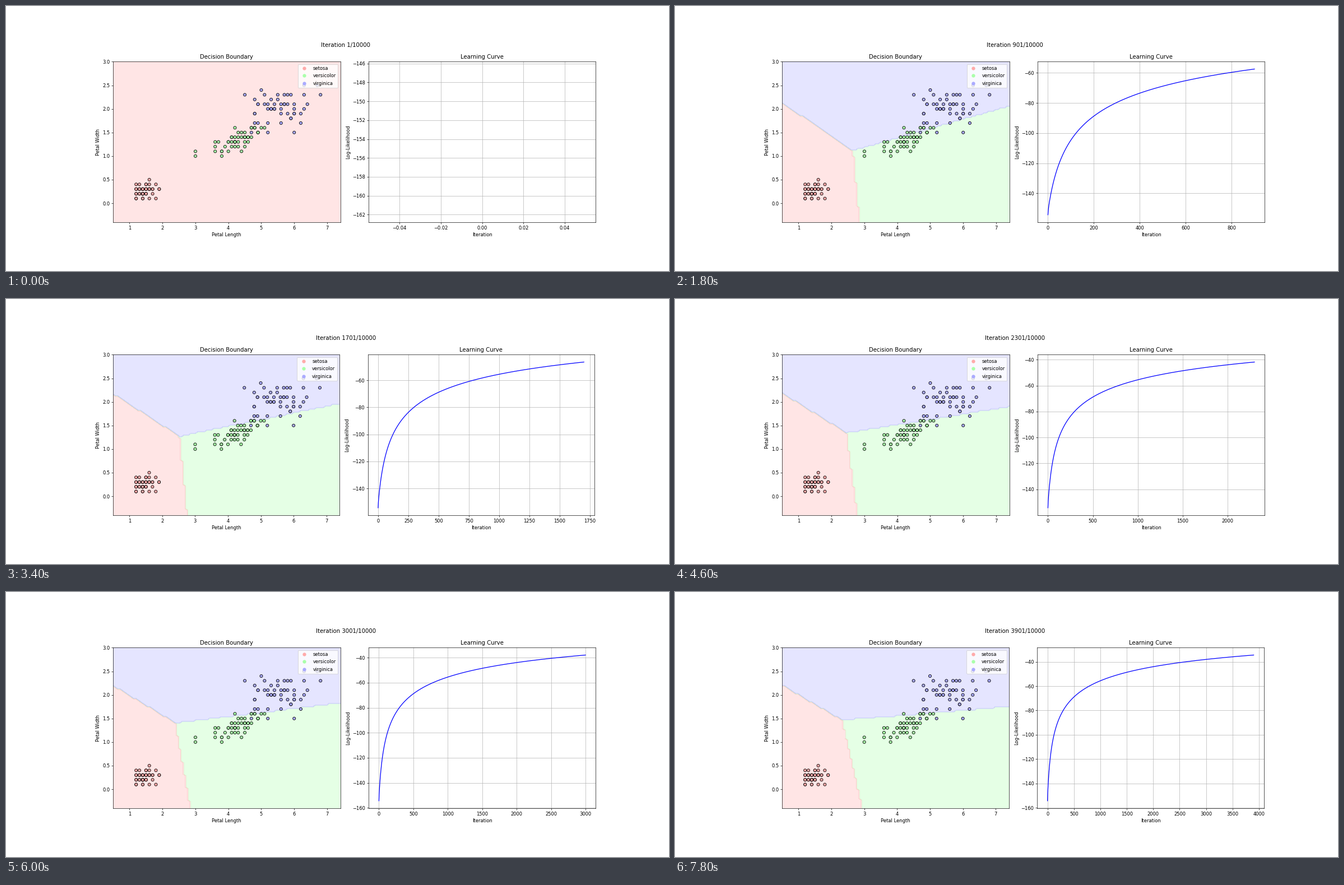
Write a matplotlib script that moves like this. It is 1183 px wide and 473 px high and loops after 8 s.

```python
import numpy as np
import matplotlib.pyplot as plt
from matplotlib.animation import FuncAnimation
from matplotlib.colors import ListedColormap
from matplotlib.lines import Line2D

W, H, DPI = 1183, 473, 60.7
LEFT, RIGHT, TOP, BOTTOM, GAP = 191.1, 1052.4, 99.5, 385.7, 50.5
DIGIT = 0.636 * 10 * DPI / 72  # width of one digit in pixels
FRAMES, STEP, TOTAL = 40, 100, 10000

NAMES = ["setosa", "versicolor", "virginica"]
COLORS = ["#FFAAAA", "#AAFFAA", "#AAAAFF"]
CMAP = ListedColormap(COLORS)
LEVELS = [0, 0.375, 0.75, 1.25, 1.625, 2]
XLIM, YLIM = (0.5, 7.4), (-0.4, 3.0)

rng = np.random.default_rng(4)


def cluster(mean, spread, corr, low, high, n=50):
    """Correlated normal points, measured to one decimal."""
    z = rng.standard_normal((n, 2))
    z = (z - z.mean(0)) / z.std(0)
    z[:, 1] = corr * z[:, 0] + np.sqrt(1 - corr ** 2) * z[:, 1]
    return np.round(np.clip(mean + z * spread, low, high), 1)


points = np.vstack([
    cluster((1.46, 0.25), (0.17, 0.10), 0.33, (1.0, 0.1), (1.9, 0.6)),
    cluster((4.26, 1.33), (0.47, 0.20), 0.79, (3.0, 1.0), (5.1, 1.8)),
    cluster((5.55, 2.03), (0.55, 0.27), 0.32, (4.5, 1.4), (6.9, 2.5)),
])
species = np.repeat([0, 1, 2], 50)


def log_likelihood(n):
    """Power-law climb with a fast and a slow start-up term."""
    climb = 168.8 * (1 - (1 + n / 40) ** -0.25)
    return -149.6 + climb - 2.5 * np.exp(-n / 60) - 2.2 * np.exp(-n / 1.5)


steps = np.arange((FRAMES - 1) * STEP + 1)
likelihood = log_likelihood(steps)
gx, gy = np.meshgrid(np.linspace(*XLIM, 100), np.linspace(*YLIM, 100))


def classify(n):
    """Class index on the grid: three borders that meet in one junction."""
    if n == 0:
        return np.zeros_like(gx)
    r = np.log(n / 300)
    xj = 2.81 - 0.12 * r - 0.028 * r ** 2
    yj = 0.845 + 0.255 * r - 0.005 * r ** 2
    y_left = 2.01 + 0.13 * r - 0.021 * r ** 2
    y_right = 2.08 + 0.065 * r - 0.075 * r ** 2
    x_bottom = 3.49 - 0.87 * r + 0.255 * r ** 2
    upper = gy > np.interp(gx, [XLIM[0], xj, XLIM[1]], [y_left, yj, y_right])
    left = gx < np.interp(gy, [YLIM[0], yj], [x_bottom, xj])
    return np.where(upper, 2.0, np.where(left, 0.0, 1.0))


fig = plt.figure(figsize=((W + 1e-6) / DPI, (H + 1e-6) / DPI), dpi=DPI, facecolor="white")
ax1, ax2 = fig.add_subplot(121), fig.add_subplot(122)
heading = fig.text(0.5125, 0.8625, "", ha="center", va="top", fontsize=12)
handles = [Line2D([], [], ls="", marker="o", ms=6, mew=1.5, color=c, label=name)
           for c, name in zip(COLORS, NAMES)]


def place(overflow=0.0):
    """Lay out both panels, leaving room on the right for a wide tick label."""
    w = (RIGHT - overflow - LEFT - GAP) / 2
    for ax, x in ((ax1, LEFT), (ax2, LEFT + w + GAP)):
        ax.set_position([x / W, 1 - BOTTOM / H, w / W, (BOTTOM - TOP) / H])
    return w


def draw_regions(n):
    ax1.clear()
    ax1.contourf(gx, gy, classify(n), levels=LEVELS, cmap=CMAP, vmin=0, vmax=2, alpha=0.3)
    ax1.scatter(*points.T, c=species, cmap=CMAP, edgecolors="k")
    ax1.set(xlim=XLIM, ylim=YLIM, title="Decision Boundary",
            xlabel="Petal Length", ylabel="Petal Width")
    ax1.legend(handles=handles, loc="upper right")


def draw_curve(n):
    ax2.clear()
    ax2.plot(steps[:n + 1], likelihood[:n + 1], color="b")
    ax2.set(title="Learning Curve", xlabel="Iteration", ylabel="Log-Likelihood")
    ax2.grid(True)


def draw(k):
    n = k * STEP
    heading.set_text(f"Iteration {n + 1}/{TOTAL}")
    w = place()
    draw_regions(n)
    draw_curve(n)
    lo, hi = ax2.get_xlim()
    last = max(t for t in ax2.get_xticks() if t <= hi)
    room = (hi - last) / (hi - lo) * w
    place(max(0.0, len(f"{last:g}") * DIGIT / 2 - room - 0.3))
    return []


anim = FuncAnimation(fig, draw, frames=FRAMES, interval=200, repeat=True,
                     repeat_delay=0, blit=False)
plt.show()
```
